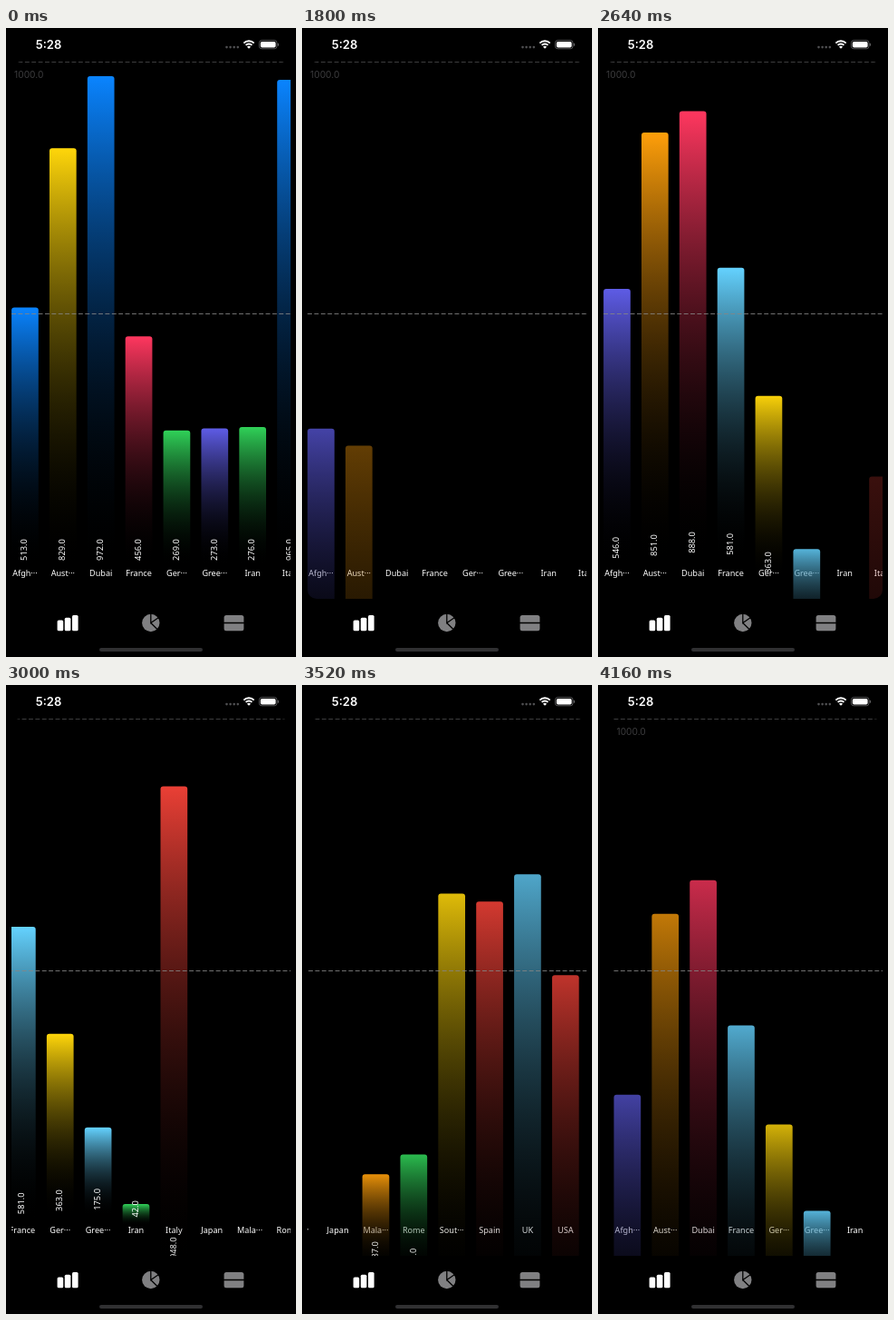
An HTML page with a canvas for the animation above (4200 ms loop, 320x692 px).

```html
<!DOCTYPE html>
<html lang="en">
<head>
<meta charset="utf-8">
<title>Bar chart</title>
<style>
html, body { margin: 0; width: 100%; height: 100%; overflow: hidden; background: #000; }
canvas { display: block; width: 320px; height: 692px; }
</style>
</head>
<body>
<canvas></canvas>
<script>
const LOOP = 4200, STEP = 40, PRESS = 1320, RELOAD = 1440, RETURN = 3320;
const LEFT = 6.1, PITCH = 41.87, BAR_W = 29.7, BASE = 592, UNIT = 0.5545, TRAVEL = 553;
const SANS = '"Noto Sans", "Open Sans", sans-serif', UI = 'Inter, Roboto, sans-serif';
const BLUE = '10,132,255', YELLOW = '255,214,10', PINK = '255,55,95', GREEN = '48,209,88',
  INDIGO = '94,92,230', ORANGE = '255,159,10', CYAN = '100,210,255', RED = '255,69,58';

const names = ['Afgh···', 'Aust···', 'Dubai', 'France', 'Ger···', 'Gree···', 'Iran', 'Italy',
  'Japan', 'Mala···', 'Rome', 'Sout···', 'Spain', 'UK', 'USA'];
const before = [[513, BLUE], [829, YELLOW], [972, BLUE], [456, PINK], [269, GREEN],
  [273, INDIGO], [276, GREEN], [965, BLUE]];
// value, colour, time of entry after scrolling back
const after = [[546, INDIGO, 3825], [851, ORANGE, 3794], [888, PINK, 3775], [581, CYAN, 3762],
  [363, YELLOW, 3746], [175, CYAN, 3733], [42, GREEN, 3720], [948, RED, 3616], [381, RED, 3425],
  [187, ORANGE], [240, GREEN], [778, YELLOW], [808, RED], [900, CYAN], [741, RED]];
const revealed = [3000, 3035, 3050, 3070, 3108, 3135, 3161];

const scrollKeys = [[2760, 0], [2880, 9], [2965, 72], [3013, 150], [3051, 196], [3078, 237],
  [3122, 307], [3170, 352], [3222, 367], [3320, 354], [3400, 333], [3500, 318], [3600, 308],
  [3650, 272], [3689, 195], [3720, 105], [3745, 60], [3785, 0], [3835, -41], [3884, -49],
  [3960, -40], [4060, -23], [4160, -11.4], [4200, -8.4]];

const canvas = document.querySelector('canvas');
const ctx = canvas.getContext('2d');
const dpr = window.devicePixelRatio || 1;
canvas.width = 320 * dpr;
canvas.height = 692 * dpr;

// smooth curve through the scroll keys
function scrollAt(t) {
  const k = scrollKeys;
  if (t <= k[0][0]) return 0;
  const i = Math.min(k.findIndex(p => p[0] > t), k.length - 1) - 1;
  const slope = j => {
    const a = k[Math.max(j - 1, 0)], b = k[Math.min(j + 1, k.length - 1)];
    return j ? (b[1] - a[1]) / (b[0] - a[0]) : 0;
  };
  const [t0, s0] = k[i], [t1, s1] = k[i + 1], d = t1 - t0, u = (t - t0) / d, v = 1 - u;
  return v * v * ((1 + 2 * u) * s0 + u * d * slope(i)) +
    u * u * ((1 + 2 * v) * s1 - v * d * slope(i + 1));
}

// spring with a response of 1 s and damping of 0.8
function spring(ms) {
  if (ms <= 0) return 0;
  const x = ms / 1000 * 2 * Math.PI;
  return 1 - Math.exp(-0.8 * x) * (Math.cos(0.6 * x) + 4 / 3 * Math.sin(0.6 * x));
}

function entryTime(i, t) {
  if (i > 8) return revealed[i - 8];
  if (t >= RETURN) return after[i][2];
  return i === 8 ? revealed[0] : 1455 + 150 * i;
}

function box(x, y, w, h, r, fill) {
  ctx.beginPath();
  ctx.roundRect(x, y, w, h, r);
  if (fill) {
    ctx.fillStyle = fill;
    ctx.fill();
  }
}

function text(str, x, y, font, fill, align = 'center') {
  ctx.font = font;
  ctx.fillStyle = fill;
  ctx.textAlign = align;
  ctx.fillText(str, x, y);
}

function dashes(x, y, color) {
  ctx.beginPath();
  ctx.setLineDash([4.92, 2.46]);
  ctx.moveTo(x, y);
  ctx.lineTo(x + 1000, y);
  ctx.strokeStyle = color;
  ctx.lineWidth = 0.85;
  ctx.stroke();
  ctx.setLineDash([]);
}

function bar(x, value, color, p) {
  const h = value * UNIT, y = BASE - h + TRAVEL * (1 - p);
  if (y > 628) return;
  ctx.globalAlpha = Math.min(1, p);
  // darkens and fades at once, so the falloff is quadratic
  const g = ctx.createLinearGradient(0, y, 0, y + h);
  g.addColorStop(0, `rgb(${color})`);
  g.addColorStop(1, 'rgba(0,0,0,0)');
  box(x, y, BAR_W, h, 3, g);
  ctx.save();
  ctx.translate(x + BAR_W / 2 + 2.2, 574 + TRAVEL * (1 - p));
  ctx.rotate(-Math.PI / 2);
  text(value.toFixed(1), 0, 0, `9.3px ${SANS}`, '#fff');
  ctx.restore();
  ctx.globalAlpha = 1;
}

function chart(t) {
  const s = scrollAt(t), x0 = LEFT - s;
  ctx.save();
  box(6, 37, 308, 591, 10);
  ctx.clip();
  text('1000.0', x0 + 3, 55, `10.2px ${UI}`, '#3c3c3e', 'left');
  names.forEach((name, i) => {
    const x = x0 + i * PITCH;
    if (x < -40 || x > 309) return;
    text(name, x + BAR_W / 2, 603.4, `500 9.1px ${SANS}`, '#fff');
    if (t < RELOAD) {
      if (before[i]) bar(x, ...before[i], 1);
    } else {
      bar(x, after[i][0], after[i][1], spring(t - entryTime(i, t)));
    }
  });
  dashes(x0, 37.5, '#48484a');
  dashes(x0, 314.5, '#858585');
  ctx.restore();
}

function statusBar() {
  text('5:28', 47, 22.8, `600 13px ${UI}`, '#fff');
  for (let i = 0; i < 4; i++) box(242.2 + i * 4.1, 19.8, 2.6, 2.6, 1.3, '#505052');
  ctx.strokeStyle = '#fff';
  ctx.lineWidth = 1.9;
  for (const r of [4.8, 8]) {
    ctx.beginPath();
    ctx.arc(268, 22.3, r, -Math.PI * 0.75, -Math.PI * 0.25);
    ctx.stroke();
  }
  ctx.beginPath();
  ctx.moveTo(268, 22.8);
  ctx.arc(268, 22.8, 2.9, -Math.PI * 0.75, -Math.PI * 0.25);
  ctx.fillStyle = '#fff';
  ctx.fill();
  box(279.4, 13.6, 19.6, 9.2, 2.8);
  ctx.strokeStyle = '#6a6a6c';
  ctx.lineWidth = 0.8;
  ctx.stroke();
  box(280.8, 15, 16.8, 6.4, 1.7, '#fff');
  box(299.8, 16.7, 1.1, 3, 0.6, '#6a6a6c');
}

function tabBar(pressed) {
  const grey = '#808082', on = pressed ? grey : '#fff';
  box(56.6, 651.5, 6.6, 11.8, 1.5, on);
  box(64.8, 648.8, 6.6, 14.5, 1.5, on);
  box(73, 646, 6.6, 17.3, 1.5, on);

  ctx.beginPath();
  ctx.arc(159.8, 654.5, 9.7, 0, 7);
  ctx.fillStyle = grey;
  ctx.fill();
  ctx.beginPath();
  ctx.moveTo(159.8, 644);
  ctx.lineTo(159.8, 654.5);
  ctx.lineTo(168.5, 648.5);
  ctx.moveTo(159.8, 654.5);
  ctx.lineTo(167.4, 662);
  ctx.strokeStyle = '#000';
  ctx.lineWidth = 1.3;
  ctx.stroke();

  box(240.6, 646, 21.8, 7.8, [2.5, 2.5, 0, 0], grey);
  box(240.6, 655.2, 21.8, 8, [0, 0, 2.5, 2.5], grey);
  box(103, 682, 114, 4, 2, '#303032');
}

function frame(now) {
  const t = Math.floor(now % LOOP / STEP) * STEP;
  ctx.setTransform(dpr, 0, 0, dpr, 0, 0);
  ctx.fillStyle = '#000';
  ctx.fillRect(0, 0, 320, 692);
  chart(t);
  statusBar();
  tabBar(t >= PRESS && t < RELOAD);
  requestAnimationFrame(() => frame(performance.now() - start));
}

const start = performance.now();
frame(0);
</script>
</body>
</html>
```
